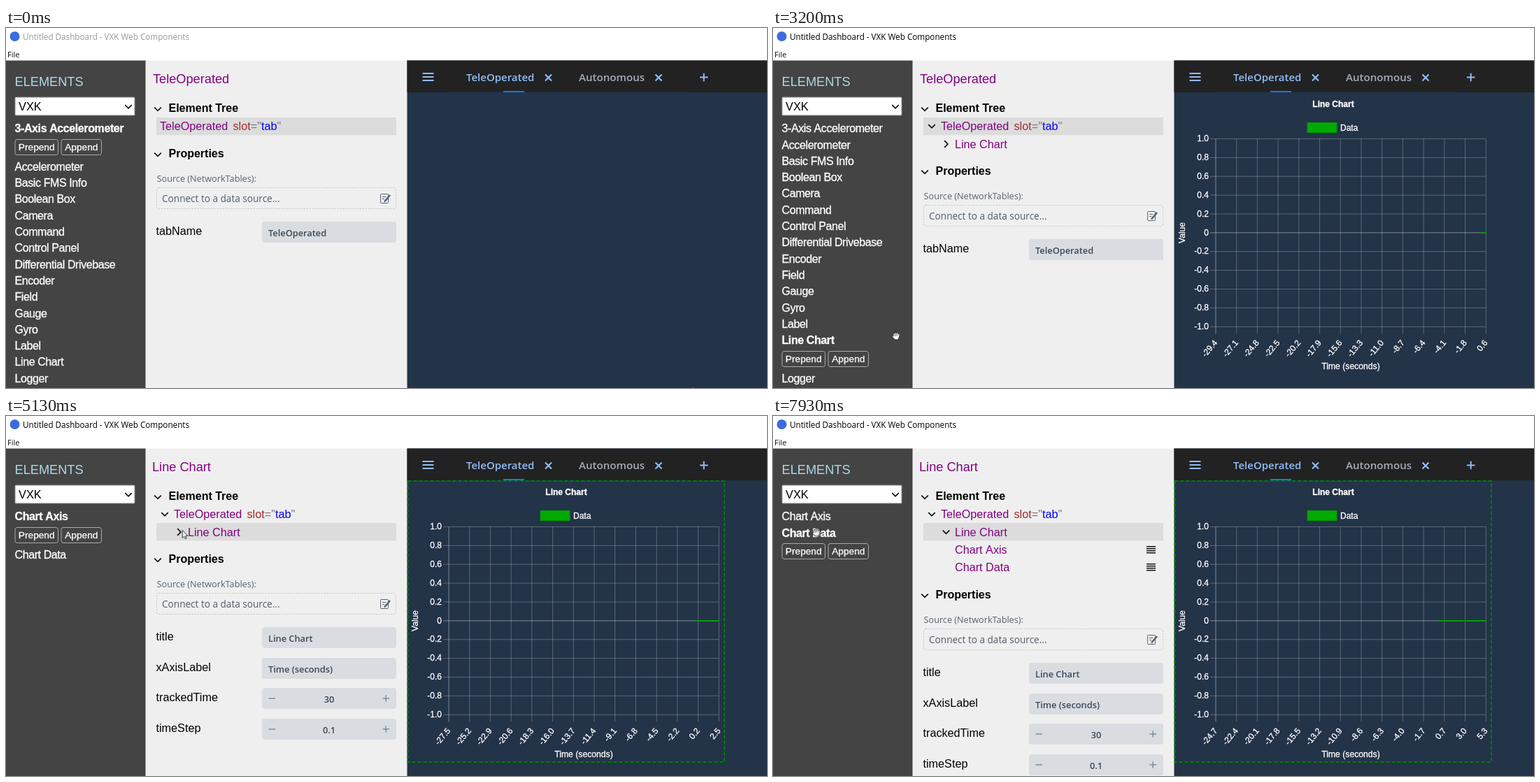
An HTML page with a canvas that plays this animation: 1088x515 px, repeating every 8000 ms.

```html
<!DOCTYPE html>
<html lang="en">
<head>
<meta charset="utf-8">
<title>Dashboard</title>
<style>
html, body { margin: 0; width: 100%; height: 100%; overflow: hidden; background: #fff; }
canvas { display: block; }
</style>
</head>
<body>
<canvas id="stage" width="1088" height="515"></canvas>
<script>
const ctx = document.getElementById('stage').getContext('2d');
const LOOP = 8000, STEP = 1000 / 15;
const ARIAL = '"Liberation Sans", Arial, sans-serif';
const UI = '"Open Sans", "Noto Sans", sans-serif';

// Moments of user actions, in ms
const AT = { focus: 1000, pickLine: 1067, append: 2600, pickChart: 3867, expand: 5200, pickData: 6333 };

const WIDGETS = ['3-Axis Accelerometer', 'Accelerometer', 'Basic FMS Info', 'Boolean Box', 'Camera',
  'Command', 'Control Panel', 'Differential Drivebase', 'Encoder', 'Field', 'Gauge', 'Gyro',
  'Label', 'Line Chart', 'Logger'];
const CHART_PARTS = ['Chart Axis', 'Chart Data'];

// Pointer keys: time, x, y
const PATH = [
  [0, 982, 513], [200, 364, 507], [333, 364, 507], [733, 83, 495], [800, 83, 495], [1000, 83, 486],
  [1467, 83, 486], [1800, 57, 478], [2133, 57, 478], [2400, 120, 474], [2600, 120, 474],
  [3200, 176, 441], [3400, 176, 441], [3733, 300, 166], [3867, 300, 166], [4267, 490, 239],
  [4467, 490, 239], [5000, 250, 161], [5333, 256, 168], [5600, 256, 168], [6000, 66, 199],
  [6400, 66, 199], [6733, 70, 193], [7067, 70, 193], [7667, 62, 167], [8000, 62, 167]
];

function pointerAt(t) {
  const i = PATH.findIndex((k, n) => n > 0 && t <= k[0]);
  const [a, b] = [PATH[i - 1], PATH[i]];
  const u = (t - a[0]) / (b[0] - a[0]);
  const e = a[0] === 0 ? u : u * u * (3 - 2 * u);
  return { x: a[1] + (b[1] - a[1]) * e, y: a[2] + (b[2] - a[2]) * e };
}

function rect(x, y, w, h, color) {
  ctx.fillStyle = color;
  ctx.fillRect(x, y, w, h);
}

function box(x, y, w, h, r, fill, stroke, dash = []) {
  ctx.beginPath();
  ctx.roundRect(x, y, w, h, r);
  if (fill) { ctx.fillStyle = fill; ctx.fill(); }
  if (stroke) {
    ctx.strokeStyle = stroke;
    ctx.lineWidth = 1;
    ctx.setLineDash(dash);
    ctx.stroke();
    ctx.setLineDash([]);
  }
}

function text(s, x, y, font, color, align = 'left') {
  ctx.font = font;
  ctx.fillStyle = color;
  ctx.textAlign = align;
  ctx.fillText(s, x, y);
}

// White text on dark ground, a little heavier
function light(s, x, y, font, align) {
  text(s, x, y, font, '#fff', align);
  ctx.strokeStyle = '#fff';
  ctx.lineWidth = 0.3;
  ctx.strokeText(s, x, y);
}

function turned(s, x, y, angle, align) {
  ctx.save();
  ctx.translate(x, y);
  ctx.rotate(angle);
  light(s, 0, 4, '12px ' + ARIAL, align);
  ctx.restore();
}

function line(color, width, ...pts) {
  ctx.beginPath();
  for (let i = 0; i < pts.length; i += 2) ctx.lineTo(pts[i], pts[i + 1]);
  ctx.strokeStyle = color;
  ctx.lineWidth = width;
  ctx.stroke();
}

const chevronDown = (x, y, color = '#111') =>
  line(color, 1.7, x - 4.8, y - 2.4, x, y + 2.4, x + 4.8, y - 2.4);
const chevronRight = (x, y) => line('#111', 1.7, x - 2.4, y - 4.8, x + 2.4, y, x - 2.4, y + 4.8);

function drawTitleBar(focused) {
  rect(0, 0, 1088, 47, '#fff');
  ctx.beginPath();
  ctx.arc(12.5, 12, 7, 0, 7);
  ctx.fillStyle = '#3c6be0';
  ctx.fill();
  text('Untitled Dashboard - VXK Web Components', 24, 17, '11.7px ' + UI, focused ? '#000' : '#999');
  text('File', 2, 41.5, '11px ' + UI, '#111');
}

// Rows of the sidebar with the buttons under the selected one
function sidebarRows(t) {
  const names = t < AT.pickChart ? WIDGETS : CHART_PARTS;
  let chosen = 0;
  if (t >= AT.pickChart) chosen = t >= AT.pickData ? 1 : 0;
  else if (t >= AT.pickLine) chosen = 13;
  let y = 144;
  return names.map((name, i) => {
    const row = { name, y, open: i === chosen };
    y += row.open ? 54.6 : 23.3;
    return row;
  });
}

function drawSidebar(rows, p) {
  rect(0, 46.5, 200, 469, '#444');
  text('ELEMENTS', 12.5, 83, '18.2px ' + ARIAL, '#add8e6');
  box(13.2, 99.2, 170.6, 25.6, 1, '#fff', '#bbb');
  text('VXK', 18, 118, '16.4px ' + ARIAL, '#000');
  chevronDown(175, 112.5);
  for (const r of rows) {
    const hover = p.x < 199 && Math.abs(p.y - r.y) < 11.6;
    ctx.letterSpacing = '-0.4px';
    light(r.name, 12.5, Math.round(r.y + 5.2), (hover || r.open ? 'bold ' : '') + '16px ' + ARIAL);
    ctx.letterSpacing = '0px';
    if (!r.open) continue;
    const top = Math.round(r.y + 15) + 0.5;
    box(13, top, 61.5, 22, 3, null, '#aaa');
    box(79, top, 57.5, 22, 3, null, '#aaa');
    light('Prepend', 43.7, top + 15.5, '13.7px ' + ARIAL, 'center');
    light('Append', 107.8, top + 15.5, '13.7px ' + ARIAL, 'center');
  }
}

function overClickable(rows, p) {
  if (p.x >= 199) return false;
  return rows.some(r => Math.abs(p.y - r.y) < 11.6 ||
    (r.open && p.x > 13 && p.x < 137 && Math.abs(p.y - r.y - 26) < 11.6));
}

function drawTree(t) {
  const hasChart = t >= AT.append, open = t >= AT.expand;
  const font = '16.2px ' + ARIAL, purple = '#800080';
  chevronDown(217, 116);
  text('Element Tree', 232.5, 120, 'bold 16px ' + ARIAL, '#000');
  rect(215, t >= AT.pickChart ? 153 : 128, 343, 25.3, '#dcdcdc');
  let x = hasChart ? 240 : 220;
  text('TeleOperated', x, 145.5, font, purple);
  x += 104.5;
  for (const [s, color] of [['slot', '#a52a2a'], ['="', '#777'], ['tab', '#00f'], ['"', '#777']]) {
    text(s, x, 145.5, font, color);
    x += ctx.measureText(s).width;
  }
  if (!hasChart) return 1;
  chevronDown(227, 140.5);
  text('Line Chart', 260, 171.5, font, purple);
  if (!open) {
    chevronRight(247.5, 166);
    return 2;
  }
  chevronDown(247.5, 166);
  CHART_PARTS.forEach((name, i) => {
    const y = 191 + i * 25.2;
    text(name, 260, y + 5.5, font, purple);
    for (let n = 0; n < 4; n++) rect(534, Math.round(y - 5) + n * 3, 13, 1.5, '#111');
  });
  return 4;
}

function drawField(y, label, value, numeric) {
  text(label, 214.5, y + 18.6, '16.2px ' + ARIAL, '#000');
  box(366, y, 192, 30, 4, '#d9dde1');
  const font = '600 12.8px ' + UI, color = '#3a4858';
  if (!numeric) return text(value, 375, y + 20.5, font, color);
  text(value, 462, y + 20.5, font, color, 'center');
  line('#7c8796', 1.4, 375.5, y + 15, 385, y + 15);
  line('#7c8796', 1.4, 538.5, y + 15, 548, y + 15);
  line('#7c8796', 1.4, 543.2, y + 10.3, 543.2, y + 19.7);
}

function drawPanel(t) {
  const chart = t >= AT.pickChart;
  rect(199.5, 46.5, 375, 469, '#efefef');
  text(chart ? 'Line Chart' : 'TeleOperated', chart ? 209 : 210, 79, '18.2px ' + ARIAL, '#800080');
  const dy = Math.round((drawTree(t) - 1) * 25.2);
  ctx.save();
  ctx.translate(0, dy);
  chevronDown(217, 181);
  text('Properties', 232.5, 185, 'bold 16px ' + ARIAL, '#000');
  text('Source (NetworkTables):', 215.5, 220, '500 12.7px ' + UI, '#566270');
  box(215.5, 228.5, 342, 30, 3, null, '#bfc3c8', [2, 2]);
  text('Connect to a data source...', 223, 249, '500 13.6px ' + UI, '#505c6a');
  box(535.5, 237.5, 11, 13, 1, null, '#56616f');
  line('#56616f', 1, 538, 241.5, 543, 241.5);
  line('#56616f', 1, 538, 244.5, 541, 244.5);
  line('#56616f', 2.6, 549, 239, 541, 248.5);
  const fields = chart
    ? [['title', 'Line Chart'], ['xAxisLabel', 'Time (seconds)'], ['trackedTime', '30', 1], ['timeStep', '0.1', 1]]
    : [['tabName', 'TeleOperated']];
  fields.forEach((f, i) => drawField(277 + Math.round(i * 43.5), ...f));
  ctx.restore();
}

function drawTabs() {
  const blue = '#90bdf9';
  rect(573.5, 46.5, 515, 469, '#233348');
  rect(573.5, 46.5, 515, 45.5, '#222');
  rect(634, 91, 342, 1, '#1c2a3c');
  rect(711, 90, 30, 2, '#1676f3');
  for (let i = 0; i < 3; i++) rect(595.5, 64 + i * 5, 16, 2, blue);
  text('TeleOperated', 658, 76, '600 15px ' + UI, blue);
  text('Autonomous', 819, 76, '600 15.1px ' + UI, '#a3acb8');
  for (const x of [775.5, 933]) {
    line(blue, 2.2, x - 4.5, 66.5, x + 4.5, 75.5);
    line(blue, 2.2, x - 4.5, 75.5, x + 4.5, 66.5);
  }
  line(blue, 2, 992, 70.5, 1003.5, 70.5);
  line(blue, 2, 997.7, 64.7, 997.7, 76.3);
}

function drawChart(t) {
  const left = 633, right = 1019.3, top = 158.5, bottom = 427.3;
  const font = '12px ' + ARIAL, grid = 'rgba(255,255,255,.25)', axis = 'rgba(255,255,255,.42)';
  const ticks = Math.floor((t - AT.append) / 100 + 0.01);

  light('Line Chart', 801, 112.5, 'bold 12px ' + ARIAL, 'center');
  box(764, 135.5, 42, 14, 0, '#00aa00', '#009a00');
  light('Data', 811, 146.5, font);

  for (let i = 0; i <= 10; i++) {
    const y = top + (bottom - top) * i / 10;
    line(i === 5 ? axis : grid, 1, left - 8, y, right, y);
    light(i === 5 ? '0' : (1 - i / 5).toFixed(1), 623, y + 3.6, font, 'right');
  }
  for (let i = 0; i <= 13; i++) {
    const x = left + (right - left) * i / 13;
    line(i ? grid : axis, 1, x, top, x, bottom + 10);
    // Time zero occupies no slot, so later labels sit one tenth higher
    const n = ticks - 300 + 23 * i;
    turned(((n >= 0 ? n + 1 : n) / 10).toFixed(1), x, 448, -50 * Math.PI / 180, 'right');
  }
  line('#00a000', 2, right - ticks * (right - left) / 300, 293, right + 0.5, 293);
  turned('Value', 584.5, 293, -Math.PI / 2, 'center');
  light('Time (seconds)', 826, 488, '12.2px ' + ARIAL, 'center');

  if (t >= AT.pickChart) {
    ctx.strokeStyle = '#008000';
    ctx.lineWidth = 2;
    ctx.setLineDash([5, 3]);
    ctx.strokeRect(574.5, 93, 452.5, 402);
    ctx.setLineDash([]);
  }
}

function drawArrow() {
  ctx.beginPath();
  [[0, 0], [0, 11], [2.6, 8.7], [4.3, 12.3], [6, 11.5], [4.4, 8], [7.8, 8]]
    .forEach(([x, y]) => ctx.lineTo(x, y));
  ctx.closePath();
  ctx.fillStyle = '#fff';
  ctx.fill();
  ctx.strokeStyle = '#222';
  ctx.lineWidth = 0.9;
  ctx.stroke();
}

function drawHand() {
  ctx.scale(0.9, 0.9);
  ctx.lineCap = 'round';
  for (const [color, w] of [['#222', 3.2], ['#fff', 1.7]]) {
    line(color, w, -2.6, 1, -3.2, -3.6);
    line(color, w, -0.4, 1, -0.6, -4.8);
    line(color, w, 1.8, 1, 2, -4.4);
    line(color, w, 3.8, 1, 4.2, -2.8);
    line(color, w, -2.6, 3, -4.8, 0.4);
    line(color, w + 3.6, -0.2, 2.4, 1.2, 2.4);
  }
  ctx.lineCap = 'butt';
}

function draw(t) {
  const p = pointerAt(t), rows = sidebarRows(t);
  drawTitleBar(t >= AT.focus);
  drawSidebar(rows, p);
  drawPanel(t);
  drawTabs();
  if (t >= AT.append) drawChart(t);
  ctx.save();
  ctx.translate(p.x, p.y);
  if (overClickable(rows, p)) drawHand();
  else drawArrow();
  ctx.restore();
}

const start = performance.now();
function tick() {
  const t = (performance.now() - start) % LOOP;
  draw(Math.min(Math.floor((t + 5) / STEP) * STEP, LOOP - STEP));
  requestAnimationFrame(tick);
}
tick();
</script>
</body>
</html>
```
